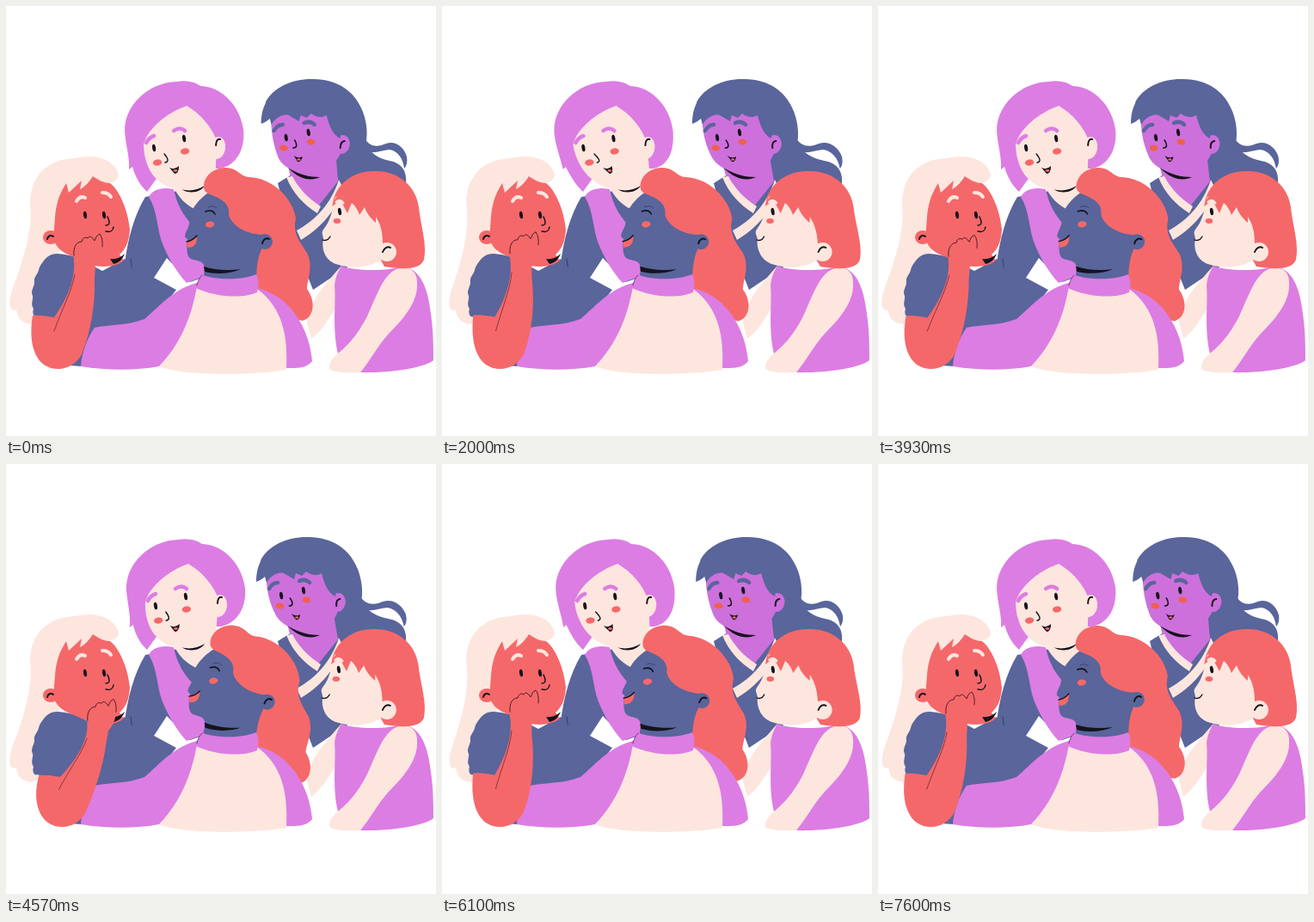
An HTML page with a canvas for the animation above (7.66 s loop, 500 by 500 pixels).

```html
<!DOCTYPE html>
<html lang="en">
<head>
<meta charset="utf-8">
<title>Friends chatting</title>
<style>
html, body { margin: 0; height: 100%; overflow: hidden; background: #fff; }
canvas { display: block; width: 100vmin; height: 100vmin; }
</style>
</head>
<body>
<canvas id="stage" width="500" height="500"></canvas>
<script>
const ctx = document.getElementById('stage').getContext('2d');
const PINK = '#dc7de3', VIOLET = '#cd70dc', INDIGO = '#59659b', RED = '#f5686a',
      PEACH = '#fde6de', INK = '#15131c', TAU = Math.PI * 2;
const LOOP = 7660, STEP = 80;

// Every point passes through the current warp, so parts bend instead of sliding.
const still = (x, y) => [x, y];
let warp = still;

const clamp = v => Math.max(0, Math.min(1, v));
const ease = v => { v = clamp(v); return v * v * (3 - 2 * v); };
const path = d => new Path2D(d.replace(/(-?[\d.]+) (-?[\d.]+)/g, (_, x, y) => warp(+x, +y).join(' ')));
const fill = (d, color) => { ctx.fillStyle = color; ctx.fill(path(d)); };
function line(d, width = 1.2, color = INK) {
  ctx.strokeStyle = color;
  ctx.lineWidth = width;
  ctx.stroke(path(d));
}
function oval(x, y, rx, ry, color, turn = 0) {
  ctx.fillStyle = color;
  ctx.beginPath();
  ctx.ellipse(...warp(x, y), rx, ry, turn, 0, TAU);
  ctx.fill();
}
const eye = (x, y) => oval(x, y, 2, 4.3, INK, -.15);
const cheek = (x, y) => oval(x, y, 5.2, 3.6, RED, -.15);
const lean = (shift, low, high, side = () => 1) =>
  (x, y) => [x + shift * side(x) * ease((low - y) / (low - high)), y];

function darkHaired(shift) {
  fill('M316 206 L332 196 L388 202 L394 226 L372 262 L402 300 L357 330 L330 262 Z', INDIGO);
  warp = lean(shift, 200, 150, x => .3 + .7 * clamp((470 - x) / 50));
  fill('M302 112 C311 94 335 84 358 85 C386 85 405 100 413 118 C420 132 421 148 419 158 C422 171 433 177 446 180 C458 182 467 190 465 207 L440 214 L388 208 L372 160 L310 128 Z', INDIGO);
  fill('M417 153 C423 165 433 164 442 160 C453 156 463 164 466 175 C467 181 466 186 463 189 C462 177 455 168 446 167 C436 168 427 173 418 168 Z', INDIGO);
  fill('M328 186 L332 204 L362 234 L386 204 L384 176 Z', VIOLET);
  warp = still;
  fill('M326 199 L333 198 C340 212 352 224 366 233 L362 241 C346 231 333 217 326 199 Z', PEACH);
  fill('M387 202 L391 210 C389 228 373 254 343 272 L338 261 C360 249 378 230 387 202 Z', PEACH);
  warp = lean(shift, 200, 150);
  fill('M309 122 C307 145 312 164 317 177 C323 189 338 194 352 195 C368 196 382 186 389 172 L386 120 Z', VIOLET);
  fill('M328 188 C340 196 353 199 365 199 C355 204 341 202 328 188 Z', INK);
  oval(391, 161, 9, 11, VIOLET, .2);
  line('M389 165 C389 160 391 157 394 157', 2);
  fill('M297 137 C297 116 306 100 324 98 L392 105 L389 154 C380 150 376 139 373 127 C368 130 361 130 355 125 L350 130 L343 127 L341 134 L329 127 C321 125 313 131 309 138 L307 131 C304 134 300 136 297 137 Z', INDIGO);
  line('M312 145 Q316 138 322 138', 4.5, INDIGO);
  line('M347 136 Q354 133 359 138', 4.5, INDIGO);
  eye(326, 153); eye(352, 147);
  oval(323, 165, 5, 3.4, '#f0604f', .1);
  oval(355, 158, 5, 3.4, '#f0604f', .1);
  line('M336 156 C339 161 339 165 334 165', 1.5);
  fill('M335 174 Q340 178 345 175 Q343 182 339 181 Z', INK);
  oval(340.5, 178.5, 2, 1.2, RED);
  warp = still;
}

function redBob(shift) {
  fill('M390 302 C371 324 353 342 350 368 L355 387 C367 378 376 363 385 348 Z', PEACH);
  fill('M390 302 C405 309 446 308 460 303 C483 304 491 331 494 358 C497 378 497 396 497 412 C484 422 442 427 411 426 L386 404 C379 376 384 343 382 325 C383 315 386 309 390 302 Z', PINK);
  fill('M452 307 C466 300 479 307 478 323 C479 345 461 365 445 381 C432 395 424 412 412 426 C398 427 384 426 377 423 C374 418 378 411 386 404 C402 391 414 375 423 354 C432 334 439 314 452 307 Z', PEACH);
  warp = lean(shift, 300, 250, x => clamp((540 - x) / 160));
  fill('M380 230 C383 207 404 191 430 192 C458 192 477 211 480 234 C482 255 490 277 486 295 C481 308 458 306 440 303 L416 260 Z', RED);
  fill('M383 222 C379 238 378 249 369 260 C366 264 369 267 369 271 C366 285 373 298 387 301 C407 307 431 303 442 290 L439 240 L400 216 Z', PEACH);
  fill('M379 233 C385 214 403 203 423 211 C442 219 446 250 443 279 L438 276 C438 261 435 253 430 245 L430 252 C423 246 419 240 417 234 L411 243 C409 237 406 232 402 229 L397 241 C394 235 391 230 389 226 Z', RED);
  oval(443, 286, 11, 11, PEACH);
  line('M438 286 C440 281 444 279 447 281', 2);
  line('M384 228 Q388 224 392 229', 3, PEACH);
  eye(388, 239); oval(385, 250, 4.3, 3, RED);
  line('M368 272 Q374 274 377 268', 1.3);
  warp = still;
}

function pinkBob(shift) {
  fill('M162 222 C149 243 141 273 138 300 L118 330 L125 374 L166 370 L198 330 L172 316 L187 293 L214 321 L240 312 L240 224 L205 214 Z', INDIGO);
  fill('M166 222 C170 213 182 210 195 213 C199 232 207 246 222 260 L236 312 L210 322 C198 309 188 292 181 274 C175 256 176 238 166 222 Z', PINK);
  line('M145 294 C147 310 149 326 152 340', .8, '#30344f');
  warp = lean(shift, 205, 165);
  fill('M164 216 C155 208 150 197 147 187 L143 190 C144 176 139 162 138 146 C137 116 165 89 198 88 C210 86 219 88 226 93 C254 94 273 120 276 144 C278 165 269 185 249 189 L190 190 L174 202 Z', PINK);
  fill('M192 205 C200 223 210 233 224 238 C230 229 236 220 243 214 L244 178 Z', PEACH);
  fill('M210 116 C187 124 164 143 160 161 C160 181 169 204 191 211 C212 217 232 207 243 192 L246 160 C240 140 225 125 210 116 Z', PEACH);
  fill('M204 213 C213 216 223 214 231 209 C226 217 213 219 204 213 Z', INK);
  oval(246, 165, 9, 13, PEACH, .15);
  line('M244 162 C244 157 246 154 249 155', 2);
  line('M163 159 Q166 153 172 151', 4.5, PINK);
  line('M195 145 Q202 140 208 145', 4.5, PINK);
  eye(172, 165); eye(207, 154);
  cheek(176, 182); cheek(208, 169);
  line('M184 172 C188 177 190 181 185 182', 1.4);
  fill('M190 188 Q196 191 201 186 Q201 195 196 195 Z', INK);
  oval(197, 191.5, 2.5, 1.4, RED);
  warp = still;
}

function blonde(hairShift) {
  warp = (x, y) => [x + hairShift * ease((y - 220) / 110), y];
  fill('M131 197 C128 178 103 171 80 177 C49 178 29 196 28 229 C32 261 19 298 8 328 C2 344 4 357 12 353 C13 365 21 369 29 370 L45 364 L75 225 L100 200 C112 207 128 209 131 197 Z', PEACH);
  warp = still;
  fill('M53 289 C62 286 71 290 80 291 L112 308 L138 294 L158 318 L168 368 L103 375 L88 419 L74 418 L56 366 C49 358 43 365 37 361 C33 363 30 358 32 352 C28 346 32 342 31 337 C28 331 33 327 33 321 C32 315 37 312 38 307 C39 302 46 291 53 289 Z', INDIGO);
  fill('M57 246 C58 232 61 220 70 206 L73 217 C78 212 83 208 88 203 L86 213 C92 210 97 204 101 198 C108 203 115 206 121 206 C132 214 142 238 144 260 C143 276 138 284 132 289 L137 296 C128 303 117 304 102 302 L77 291 C65 287 58 280 55 271 Z', RED);
  oval(52, 269, 9, 8, RED);
  line('M48 271 C49 267 52 266 55 268', 2);
  fill('M121 294 C128 295 134 292 138 288 C135 296 130 299 125 300 Z', INK);
  line('M82 227 Q86 220 92 223', 4, PEACH);
  line('M112 217 Q119 217 122 222', 4, PEACH);
  eye(92, 243); eye(114, 243);
  line('M118 245 C121 251 121 255 116 255', 1.4);
  line('M116 262 Q124 264 125 257', 1.4);
}

function curlyHead(angle) {
  const c = Math.cos(angle), s = Math.sin(angle), px = 265, py = 312;
  warp = (x, y) => [px + (x - px) * c - (y - py) * s, py + (x - px) * s + (y - py) * c];
  fill('M242 213 C228 220 215 235 213 247 C215 256 208 262 208 268 C209 271 213 270 210 275 C211 281 209 290 215 294 C222 297 230 295 231 305 L229 321 L292 321 L310 270 L275 220 Z', INDIGO);
  fill('M230 210 C230 198 241 188 256 188 C271 189 271 198 283 199 C310 200 334 224 337 247 C333 264 341 273 350 287 C358 303 350 319 350 329 C361 344 358 362 345 366 C328 363 304 349 292 330 C290 309 292 294 297 283 L300 266 C282 266 263 257 259 243 C261 228 247 223 237 219 C232 217 230 214 230 210 Z', RED);
  oval(301, 274, 9, 9, INDIGO);
  line('M298 276 C299 271 303 269 306 271', 2);
  line('M232 239 Q240 236 243 242', 1.6);
  line('M235 234 Q241 231 245 235', 1, '#3d4570');
  cheek(237, 254);
  fill('M210 274 Q217 273 222 267 Q223 281 211 281 Z', RED);
  line('M210 274 Q217 273 222 267', 1.4);
  fill('M230 303 C242 307 258 308 273 306 C260 312 242 312 231 309 Z', INK);
  warp = still;
}

function curlyBody() {
  fill('M225 321 C194 329 180 348 161 364 C140 372 120 370 103 374 C94 386 88 405 87 419 C118 424 150 424 178 419 C202 400 217 370 226 328 Z', PINK);
  fill('M291 328 C331 336 353 376 356 413 C349 422 337 421 324 421 L300 380 Z', PINK);
  fill('M222 326 C216 361 203 393 178 419 C204 430 286 430 326 423 C328 384 322 351 292 329 Z', PEACH);
  fill('M226 312 C244 319 274 319 291 312 C294 318 294 325 292 333 C274 341 242 338 221 328 Z', PINK);
  line('M228 313 Q223 318 222 325', .8, '#5a2b61');
}

function blondeArm(handX, handY, elbowX) {
  warp = (x, y) => {
    const k = ease((y - 285) / 110);
    return [x + handX * (1 - k) + elbowX * k, y + handY * (1 - k)];
  };
  fill('M31 360 C27 384 30 406 44 417 C61 428 80 420 88 405 C98 380 104 350 103 316 L104 302 C112 293 114 279 110 265 C106 264 106 270 104 273 C101 267 98 265 96 270 C91 266 90 271 89 274 C81 272 78 286 79 297 C81 320 68 345 56 362 C47 361 40 359 31 360 Z', RED);
  line('M79 290 C78 280 82 274 88 274 Q90 267 95 270 Q98 265 103 273 Q105 266 109 265 Q113 270 112 280', 1, '#4d2027');
  line('M80 312 C76 333 66 350 56 378', .8, '#6d2c35');
  warp = still;
}

function draw(t) {
  const a = t / LOOP * 2 * TAU;   // two sways per loop
  const b = t / LOOP * 3 * TAU;
  const { sin, cos } = Math;
  const reach = Math.max(0, sin(a));
  ctx.fillStyle = '#fff';
  ctx.fillRect(0, 0, 500, 500);
  darkHaired(-2.7 + cos(b) + 2.3 * sin(b) + 1.4 * cos(2 * b));
  redBob(1.8 * (cos(a) - 1));
  pinkBob(-1.3 + 3.9 * cos(a) - 2.5 * cos(2 * a));
  blonde(2.3 * (cos(.63) - cos(a - .63)));
  curlyHead(.039 * (.92 - cos(2 * a + .41)));
  curlyBody();
  blondeArm(17 * reach ** .9, 9 * reach + 2.3 * Math.min(0, cos(a)) * (1 - reach), 7 * Math.abs(sin(a / 2)) ** .7);
}

ctx.lineCap = ctx.lineJoin = 'round';
function frame(now) {
  draw(Math.floor(now % LOOP / STEP) * STEP);
  requestAnimationFrame(frame);
}
requestAnimationFrame(frame);
</script>
</body>
</html>
```
